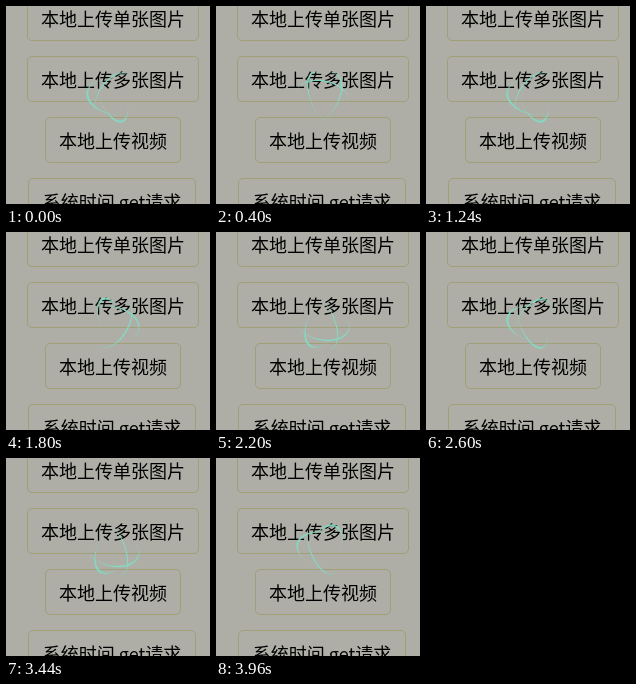
Animation of 204x198 px, one loop 4000 ms. Source, as an HTML page:

```html
<!DOCTYPE html>
<html lang="zh-CN">
<head>
<meta charset="utf-8">
<title>加载中</title>
<style>
  html, body { margin: 0; width: 100%; height: 100%; overflow: hidden; background: #aeaea7; }
  .stage { position: relative; width: 100%; height: 100%; overflow: hidden; contain: strict; }
  .button {
    position: absolute; box-sizing: border-box; height: 46px;
    border: 1px solid #a09f76; border-radius: 5px;
    font: 18px/44px "Noto Sans CJK SC", "Noto Sans CJK", sans-serif;
    color: #000; text-align: center; white-space: nowrap;
  }
  .loader { position: absolute; left: 79.5px; top: 64px; width: 54px; height: 54px; perspective: 800px; }
  .ring { position: absolute; inset: 0; box-sizing: border-box; border-radius: 50%; }
  .ring.one { border-bottom: 2.2px solid #80dcc4; }
  .ring.two { border-right: 2.2px solid #80dcc4; }
  .ring.three { border-top: 2.2px solid #80dcc4; }
</style>
</head>
<body>
<div class="stage">
  <div class="button" style="left:21px;top:-11px;width:172px">本地上传单张图片</div>
  <div class="button" style="left:21px;top:50px;width:172px">本地上传多张图片</div>
  <div class="button" style="left:39px;top:111px;width:136px">本地上传视频</div>
  <div class="button" style="left:22px;top:172px;width:168px">系统时间 get请求</div>
  <div class="loader">
    <div class="ring one"></div>
    <div class="ring two"></div>
    <div class="ring three"></div>
  </div>
</div>
<script>
  const LOOP = 4000, TURN = 1260, STEP = 40, START = 160;
  const END = START + 360 * LOOP / TURN;
  const tilts = { one: [35, -45], two: [50, 10], three: [35, 55] };

  for (const [name, [x, y]] of Object.entries(tilts)) {
    const pose = z => ({ transform: `rotateX(${x}deg) rotateY(${y}deg) rotateZ(${z}deg)` });
    document.querySelector(`.ring.${name}`).animate([pose(START), pose(END)], {
      duration: LOOP, iterations: Infinity, easing: `steps(${LOOP / STEP})`
    });
  }
</script>
</body>
</html>
```
